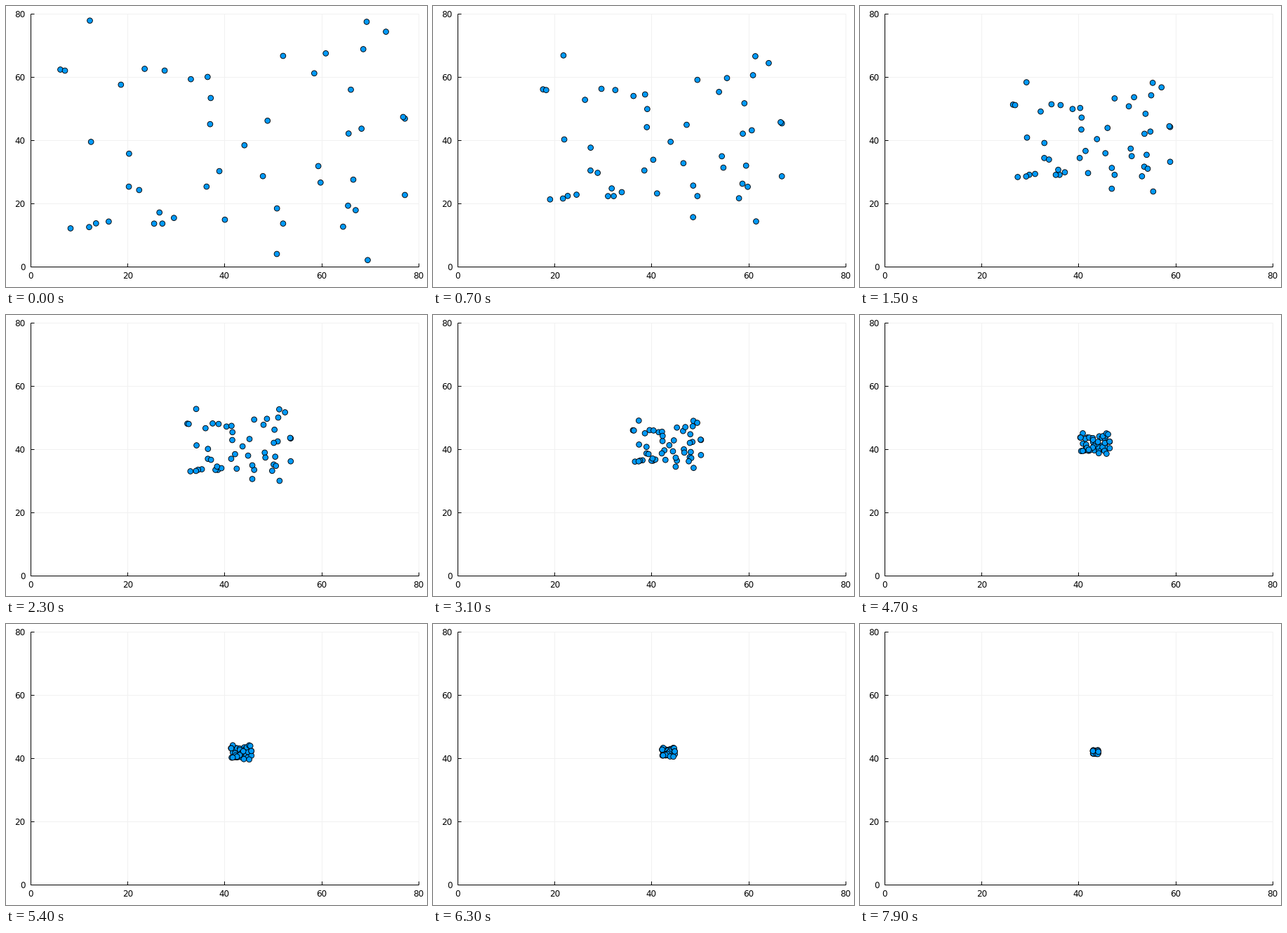
Write a matplotlib script that moves like this. It is 600 px wide and 400 px high and loops after 8000 ms.

```python
import numpy as np
import matplotlib.pyplot as plt
from matplotlib.animation import FuncAnimation

DPI = 100
PX = 72 / DPI  # points per pixel
FRAMES, STEP_MS = 80, 100

LEFT, RIGHT, TOP, BOTTOM = 35, 587.8, 11.4, 371

COUNT = 50
DECAY = 0.949  # share of the distance to the center kept per step
CENTER = np.array([336, 182.2])

# Outermost dots set the outline of the cloud; the rest scatter inside it
RIM = np.array([
    (119.5, 20.8), (77.5, 90.5), (92, 316.5), (118.5, 314.7),
    (514, 22.5), (541.5, 36.6), (568.5, 160.3), (568.5, 269),
    (386, 353), (515.5, 361.7), (84, 92), (566, 158),
])
rng = np.random.default_rng(12)
inner = rng.uniform((120, 38), (530, 325), (COUNT - len(RIM), 2))
start = np.vstack([inner, RIM])

fig = plt.figure(figsize=(6, 4), dpi=DPI, facecolor="white")
ax = fig.add_axes([0, 0, 1, 1])
ax.set(xlim=(0, 600), ylim=(400, 0))
ax.axis("off")


def line(x, y, color="black", z=2):
    ax.plot(x, y, color=color, lw=PX, zorder=z, solid_capstyle="butt")


def label(x, y, value, ha):
    ax.text(x, y, str(value), ha=ha, va="center_baseline",
            family="DejaVu Sans", size=12 * PX, color="black")


for i in range(5):
    x = LEFT + (RIGHT - LEFT) * i / 4
    y = BOTTOM - (BOTTOM - TOP) * i / 4
    if i:
        line([x, x], [TOP, BOTTOM], "#f1f1f1", 1)
        line([LEFT, RIGHT], [y, y], "#f1f1f1", 1)
    line([x, x], [BOTTOM - 5, BOTTOM])
    line([LEFT, LEFT + 5], [y, y])
    label(x, 382.6, 20 * i, "center")
    label(27.3, y - 0.3, 20 * i, "right")

line([LEFT, LEFT], [TOP, BOTTOM])
line([LEFT, RIGHT], [BOTTOM, BOTTOM])

# One colour per dot keeps sub-pixel placement
dots = ax.scatter(*start.T, s=(7.7 * PX) ** 2, c=["#009AFA"] * COUNT,
                  edgecolors=["black"] * COUNT, linewidths=0.9 * PX, zorder=3)


def update(n):
    dots.set_offsets(CENTER + (start - CENTER) * DECAY ** n)
    return (dots,)


anim = FuncAnimation(fig, update, frames=FRAMES, interval=STEP_MS,
                     repeat=True, repeat_delay=0, blit=False)
plt.show()
```
